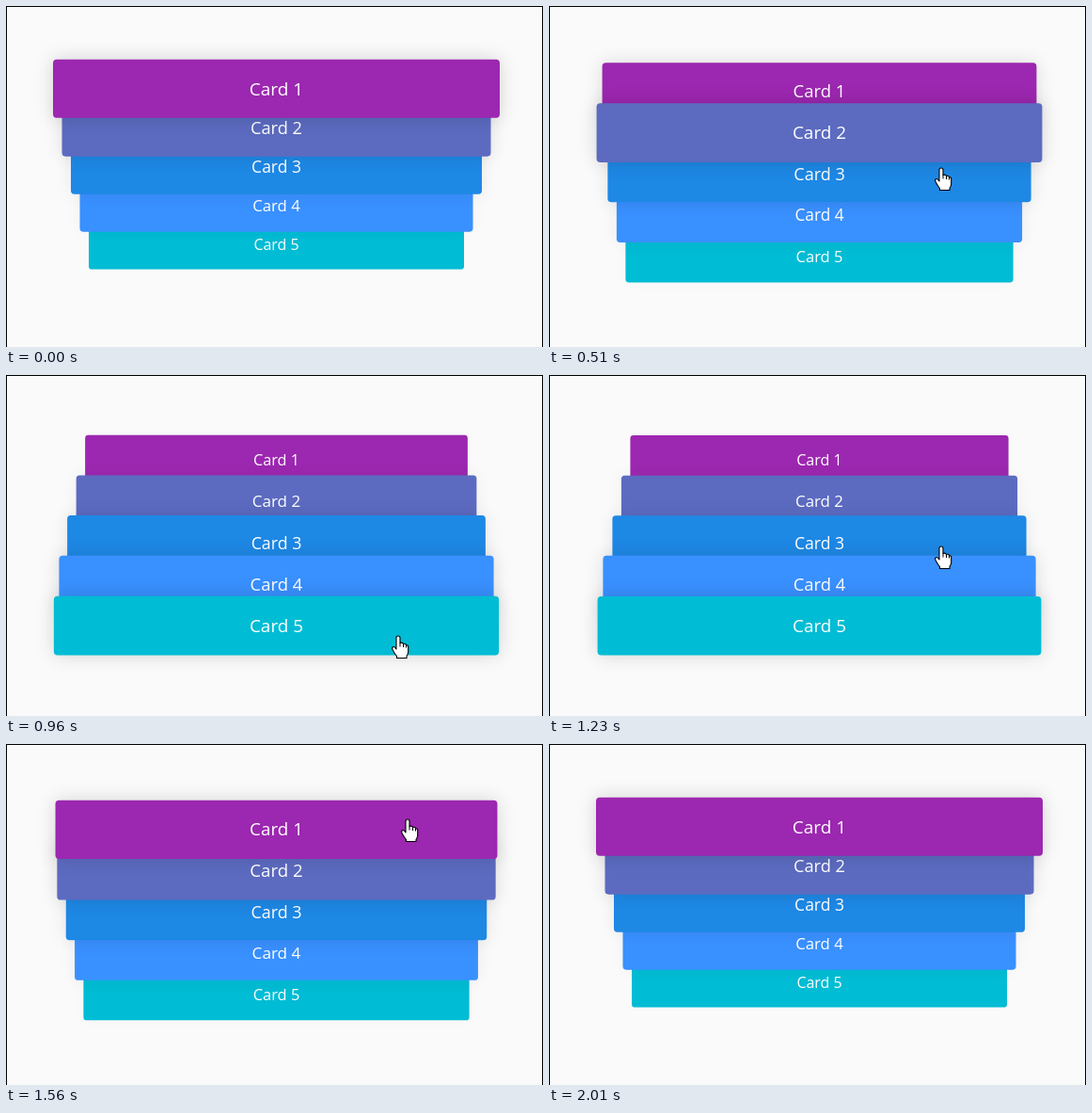
Recreate the animation shown at these times as an HTML page. Size 571 by 362 pixels, loop 3.42 s.

```html
<!DOCTYPE html>
<html lang="en">
<head>
<meta charset="utf-8">
<title>Card stack</title>
<style>
  html, body { margin: 0; width: 100%; height: 100%; overflow: hidden; background: #fafafa; }
  #stage {
    position: absolute; left: 0; top: 0; width: 571px; height: 362px;
    box-sizing: border-box; overflow: hidden; isolation: isolate;
  }
  #frame {
    position: absolute; inset: 0; z-index: 3000;
    border: 1px solid #000; border-bottom: 0;
  }
  .card {
    position: absolute; left: 50px; top: -31.25px; width: 475px; height: 62.5px;
    border-radius: 4px; color: #fff; text-align: center;
    font: 19px/62.5px "Open Sans", "Noto Sans", sans-serif;
  }
  #cursor { position: absolute; left: 0; top: 0; overflow: visible; z-index: 2000; }
  #cursor path { fill: #fff; stroke: #000; stroke-width: 1.1; stroke-linejoin: round; }
  #cursor .crease { fill: none; stroke-width: 1; }
</style>
</head>
<body>
<div id="stage">
  <svg id="cursor" width="1" height="1">
    <g id="arrow"><path d="M.5 .5V16.5L4.2 13L6.6 18.5L9 17.5L6.7 12.2H11.8Z"/></g>
    <g id="hand">
      <path d="M-2 2a2 2 0 0 1 4 0V7.5q2.5-1 3.5 1q2.5-.7 3 1q2.2 0 2.2 2.5V17q0 2-1.7 4.5V23.5H-1.5V21.5Q-3 20-6 14.5Q-7 12.5-5.5 11.7Q-4 11-2 14Z"/>
      <path class="crease" d="M2 7.5V11.5M5.5 8.5V12M8.5 9.5V12.5"/>
    </g>
  </svg>
  <div id="frame"></div>
</div>
<script>
const LOOP = 3420, TICK = 30, DURATION = 180;
const OPEN_AT = 160, CLOSE_AT = 1640, CURSOR_IN = 120, CURSOR_OUT = 2010;
const COLORS = ['#9c27b0', '#5c6bc0', '#1e88e5', '#3990ff', '#00bcd4'];

// [time, index of the hovered card]
const HOVERS = [[385, 1], [520, 2], [700, 3], [840, 4], [1200, 3], [1245, 2], [1305, 1], [1478, 0]];

// [time, x, y] of the pointer tip
const PATH = [
  [120, 525, 45], [330, 425, 110], [510, 417, 172], [780, 417, 244], [960, 417, 277],
  [1110, 416, 264], [1180, 416, 234], [1230, 417, 182], [1470, 425, 101], [1560, 427, 80],
  [1710, 452, 43], [1830, 497, 8], [1980, 547, 2]
];

const $ = id => document.getElementById(id);
const clamp = x => Math.min(1, Math.max(0, x));
const lerp = (a, b, k) => a + (b - a) * k;

// Same curve as the CSS keyword "ease"
function ease(x) {
  if (x <= 0 || x >= 1) return clamp(x);
  const bezier = (u, a, b) => 3 * u * (1 - u) ** 2 * a + 3 * u * u * (1 - u) * b + u ** 3;
  let lo = 0, hi = 1;
  for (let i = 0; i < 20; i++) {
    const mid = (lo + hi) / 2;
    if (bezier(mid, .25, .25) < x) lo = mid; else hi = mid;
  }
  return bezier(lo, .1, 1);
}

const progress = (t, start) => clamp((t - start) / DURATION);

// Each hover retargets the cards from wherever they are
function scaleAt(card, t) {
  let scale = 1 - .04 * card;
  HOVERS.forEach(([start, active], n) => {
    const end = Math.min(t, n + 1 < HOVERS.length ? HOVERS[n + 1][0] : LOOP);
    const x = progress(end, start);
    const target = 1 - .04 * Math.abs(card - active);
    scale = lerp(scale, target, card === active ? ease(x) : x);
  });
  return scale;
}

function pointerAt(t) {
  const next = PATH.findIndex(p => p[0] > t);
  if (next < 1) return PATH[next < 0 ? PATH.length - 1 : 0].slice(1);
  const [t0, x0, y0] = PATH[next - 1], [t1, x1, y1] = PATH[next];
  const k = (t - t0) / (t1 - t0);
  return [lerp(x0, x1, k), lerp(y0, y1, k)];
}

const cards = COLORS.map((color, i) => {
  const el = document.createElement('div');
  el.className = 'card';
  el.textContent = 'Card ' + (i + 1);
  el.style.background = color;
  return $('stage').appendChild(el);
});

function draw(t) {
  const open = ease(progress(t, OPEN_AT)) - ease(progress(t, CLOSE_AT));
  cards.forEach((el, i) => {
    const scale = scaleAt(i, t);
    const y = lerp(87.7 + 41.25 * i, 90.3 + 43.85 * i, open);
    el.style.transform = `translateY(${y}px) scale(${scale})`;
    el.style.zIndex = Math.round(scale * 1000);
    el.style.boxShadow = `0 0 20px rgba(0,0,0,${Math.max(0, scale - .84).toFixed(3)})`;
  });

  const [x, y] = pointerAt(t);
  const over = t >= OPEN_AT && t < CLOSE_AT;
  $('cursor').style.display = t >= CURSOR_IN && t < CURSOR_OUT ? '' : 'none';
  $('cursor').style.transform = `translate(${x}px, ${y}px)`;
  $('hand').style.display = over ? '' : 'none';
  $('arrow').style.display = over ? 'none' : '';
}

const startTime = performance.now();
function tick() {
  const t = (performance.now() - startTime) % LOOP;
  draw(Math.floor(t / TICK) * TICK);
  requestAnimationFrame(tick);
}
tick();
</script>
</body>
</html>
```
